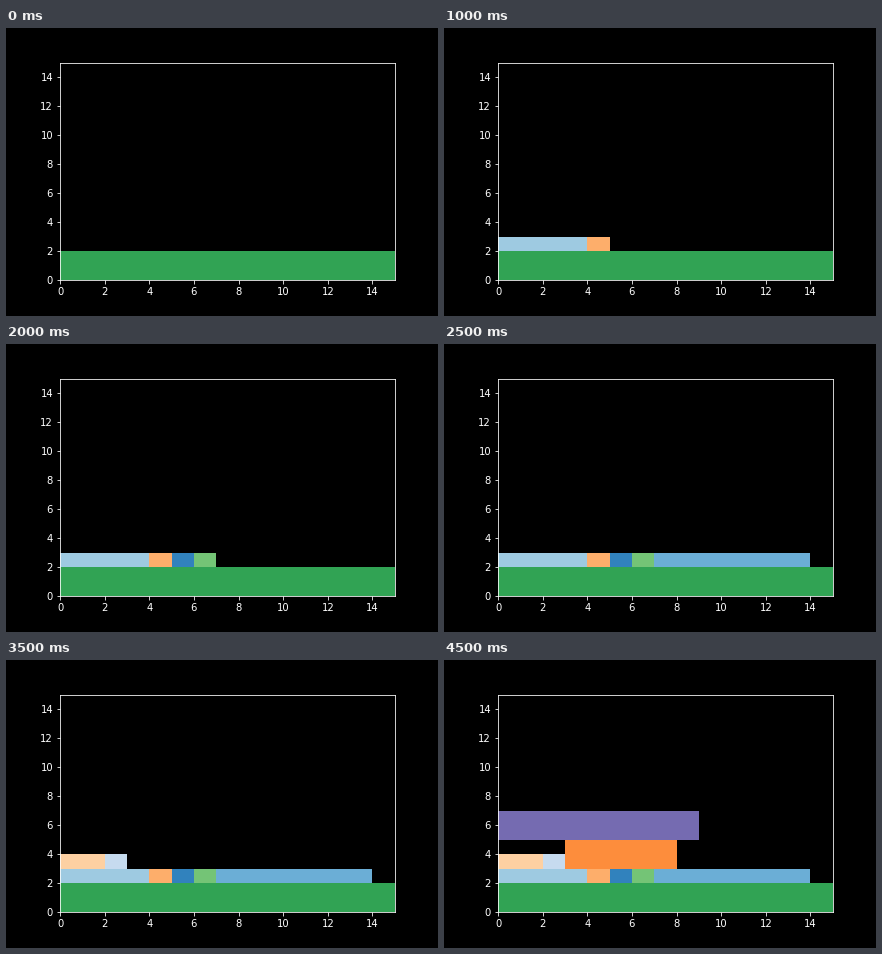
Animation, 432 px wide and 288 px high, one loop 5000 ms. Source, as a matplotlib script:

```python
import matplotlib.pyplot as plt
from matplotlib.animation import FuncAnimation
from matplotlib.patches import Rectangle

plt.style.use("dark_background")
plt.rcParams["font.family"] = "DejaVu Sans"
plt.rcParams["font.size"] = 10

SIZE = 15
STEP_MS = 500
COLORS = plt.get_cmap("tab20c").colors

WIDTHS = [15, 4, 1, 1, 1, 7, 2, 1, 5, 9]
SHADES = [8, 2, 6, 0, 9, 1, 7, 3, 5, 12]
TALL = {5, 9, 15}  # widths of the blocks that are two units high


def shelf_pack(widths):
    """Fill shelves from left to right; open a new one when a block won't fit."""
    x = y = shelf = 0
    for w in widths:
        h = 2 if w in TALL else 1
        if x + w > SIZE:
            x, y, shelf = 0, y + shelf, 0
        yield (x, y), w, h
        x, shelf = x + w, max(shelf, h)


fig, ax = plt.subplots(figsize=(6, 4), dpi=72)
fig.subplots_adjust(left=0.125, right=0.9, bottom=0.125, top=0.88)
ax.set(xlim=(0, SIZE), ylim=(0, SIZE),
       xticks=range(0, SIZE, 2), yticks=range(0, SIZE, 2))

blocks = [
    ax.add_patch(Rectangle(pos, w, h, facecolor=COLORS[shade], linewidth=0))
    for (pos, w, h), shade in zip(shelf_pack(WIDTHS), SHADES)
]


def update(step):
    for i, block in enumerate(blocks):
        block.set_visible(i <= step)
    return blocks


anim = FuncAnimation(fig, update, frames=len(blocks), interval=STEP_MS,
                     init_func=lambda: update(0), repeat=True, repeat_delay=0)
plt.show()
```
